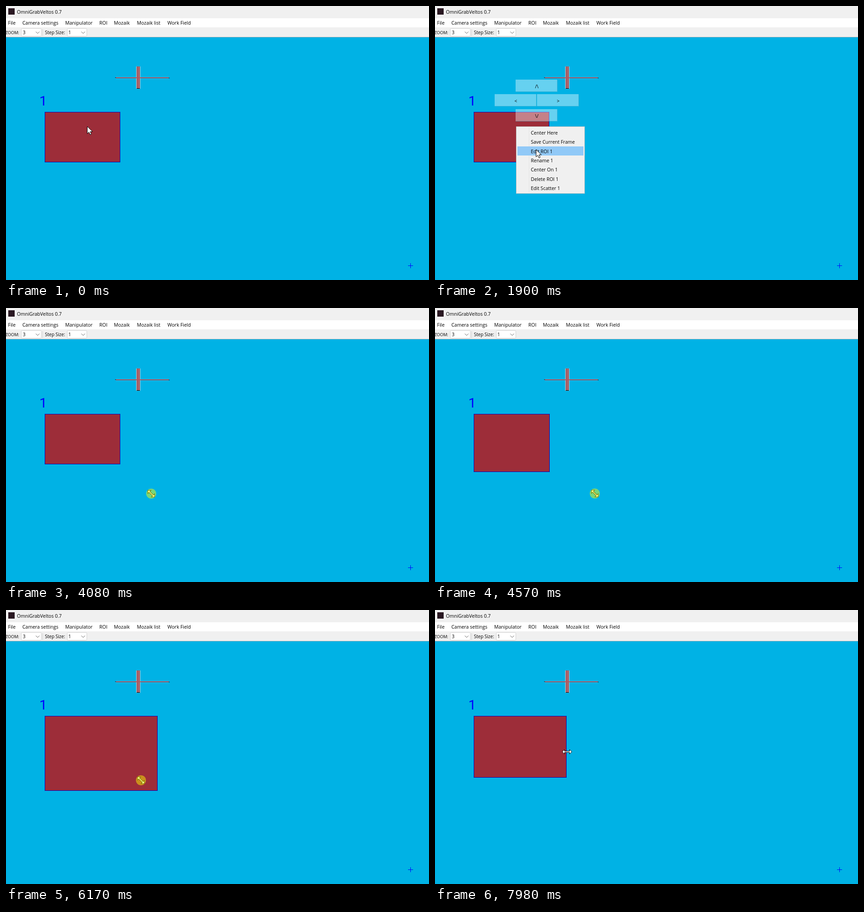
An HTML page for the animation above (8000 ms loop, 929 by 603 pixels).

```html
<!DOCTYPE html>
<html lang="en">
<head>
<meta charset="utf-8">
<title>OmniGrabVeltos 0.7</title>
<style>
  html, body { margin: 0; width: 100%; height: 100%; overflow: hidden; }
  svg { display: block; width: 100%; height: 100%; }
  text { font: 10.5px "Open Sans", "Noto Sans", sans-serif; white-space: pre; }
  .tool { font-size: 10px; }
  .mid { text-anchor: middle; }
</style>
</head>
<body>
<svg viewBox="0 0 929 603">
  <rect width="929" height="603" fill="#00b2e5"/>
  <rect width="929" height="69" fill="#f0f0f0"/>
  <rect y="27" width="929" height="20" fill="#fff"/>
  <rect y="68" width="929" height="1" fill="#a0b0b8"/>
  <rect x="5" y="5" width="14" height="14" fill="#2a1822"/>
  <text x="24" y="16.5">OmniGrabVeltos 0.7</text>
  <g id="bar"></g>
  <g fill="#fff" stroke="#d0d0d0">
    <path d="M80.5 51V66"/>
    <rect x="33.5" y="49.5" width="44" height="17" rx="2"/>
    <rect x="134.5" y="49.5" width="43" height="17" rx="2"/>
    <path d="M65.5 56.5l4 4 4-4M165.5 56.5l4 4 4-4" fill="none" stroke="#606060"/>
  </g>
  <text x="-1.5" y="62" style="font-size:9.3px">ZOOM:</text>
  <text class="tool" x="37" y="62">3</text>
  <text class="tool" x="85.5" y="62">Step Size:</text>
  <text class="tool" x="137" y="62">1</text>

  <rect x="286" y="133" width="9" height="49" fill="#b0626a"/>
  <path d="M286.5 133V182M294.5 133V182" stroke="#e4d5d8"/>
  <path d="M287.5 133V182M293.5 133V182" stroke="#6b4a54"/>
  <path d="M287 181.5H294" stroke="#000"/>
  <path d="M241 158H358" stroke="#b8545c" stroke-width="2"/>
  <path d="M239.5 157.5h2M357.5 158.5h2" stroke="#102030"/>
  <path d="M883 571.5H894M888.5 566V577" stroke="#00f"/>
  <rect id="roi" x="85.5" y="233.5" fill="#9d2d39" stroke="#0800b8"/>
  <text x="73.2" y="219" fill="#00f" style="font:30px Roboto,Inter,sans-serif">1</text>

  <g id="popup">
    <g id="pad"></g>
    <rect x="178.5" y="265.5" width="150" height="147" fill="#f0f0f0" stroke="#c4c4c4"/>
    <path d="M206.5 268V410" stroke="#e4e4e4"/>
    <rect id="hover" x="181" width="145" height="20" fill="#91c9f7"/>
    <g id="items"></g>
  </g>

  <path id="cursor" fill="#fff" stroke="#000"/>
  <circle id="press" r="11" fill-opacity=".47"/>
</svg>
<script>
const $ = id => document.getElementById(id);
const set = (el, attrs) => { for (const k in attrs) el.setAttribute(k, attrs[k]); };
const show = (el, on) => { el.style.display = on ? '' : 'none'; };
const label = (x, y, s, cls = '') =>
  `<text x="${x}" y="${y}" class="${cls}">${s}</text>`;

$('bar').innerHTML = [
  [4.5, 'File'], [36, 'Camera settings'], [130, 'Manipulator'], [205, 'ROI'],
  [237, 'Mozaik'], [287.5, 'Mozaik list'], [354.5, 'Work Field']
].map(([x, s]) => label(x, 41, s)).join('');

// Four translucent arrow buttons around one centre
$('pad').innerHTML = [
  [0, -1, '/\\'], [-1, 0, '&lt;'], [1, 0, '&gt;'], [0, 1, '\\/']
].map(([dx, dy, s]) => {
  const x = 177 + Math.round(46.5 * dx), y = 194 + Math.round(32.5 * dy);
  return `<rect x="${x}" y="${y}" width="92" height="27" fill="#fff" fill-opacity=".4"/>
    <path d="M${x} ${y + 26.5}h91.5V${y}" fill="none" stroke="#0088b0" stroke-opacity=".4"/>` +
    label(x + 46.5, y + 19, s, 'mid');
}).join('');

const ROW = 20.4, TOP = 268.5;
$('items').innerHTML = ['Center Here', 'Save Current Frame', 'Edit ROI 1', 'Rename 1',
  'Center On 1', 'Delete ROI 1', 'Edit Scatter 1'
].map((s, i) => label(210.5, TOP + 14.3 + ROW * i, s)).join('');

const ARROW = 'M0 0V16L3.7 12.5 6.3 18.2 9 17 6.5 11.5H11.5Z';
const SIZER = 'M-10.5 0L-5.5-5V-1.3H5.5V-5L10.5 0 5.5 5V1.3H-5.5V5Z';

// Pointer moves: begin, end, target, and a bend point for curved ones
const home = [178.5, 265];
const moves = [
  [1130, 1900, [222, 316]],
  [2400, 3090, [251, 344]],
  [3570, 4230, [341, 409], [250, 412]],
  [4400, 4650, [354, 408]],
  [4650, 6570, [289.5, 369], [320, 395]],
  [7530, 7980, [290, 312]]
];
const GRAB = 3570, LAG = 700, STEP = 149;

const within = (t, a, b) => t >= a && t < b;
const ease = u => u * u * (3 - 2 * u);

function pointer(t) {
  let p = home;
  for (const [a, b, to, bend] of moves) {
    if (t < a) break;
    const s = ease(Math.min(1, (t - a) / (b - a)));
    p = p.map((v, i) => {
      const c = bend ? bend[i] : (v + to[i]) / 2;
      return (1 - s) ** 2 * v + 2 * s * (1 - s) * c + s * s * to[i];
    });
  }
  return p;
}

// The box follows the dragged corner late and in jumps
function corner(t) {
  const seen = Math.floor((t - LAG) / STEP) * STEP;
  return pointer(Math.min(6570, Math.max(GRAB, seen))).map(v => Math.floor(v - 1));
}

function draw(t) {
  const [x, y] = pointer(t);
  const [right, bottom] = corner(t);
  set($('roi'), { width: right - 85, height: bottom - 233 });

  const row = Math.floor((y - TOP) / ROW);
  show($('popup'), within(t, 550, 2390));
  show($('hover'), row >= 0);
  set($('hover'), { y: Math.round(TOP + ROW * row) });

  const rightDown = within(t, 70, 170);
  const leftDown = within(t, 2290, 2390) || within(t, 3320, 6570);
  show($('press'), rightDown || leftDown);
  set($('press'), { cx: x, cy: y, fill: rightDown ? '#f00' : '#ff0' });

  const sizing = t >= 3050;
  const turn = sizing && t < 7620 ? 45 : 0;
  set($('cursor'), {
    d: sizing ? SIZER : ARROW,
    transform: `translate(${x} ${y}) rotate(${turn})`
  });
}

const start = performance.now();
(function tick() {
  draw((performance.now() - start) % 8000);
  requestAnimationFrame(tick);
})();
</script>
</body>
</html>
```
